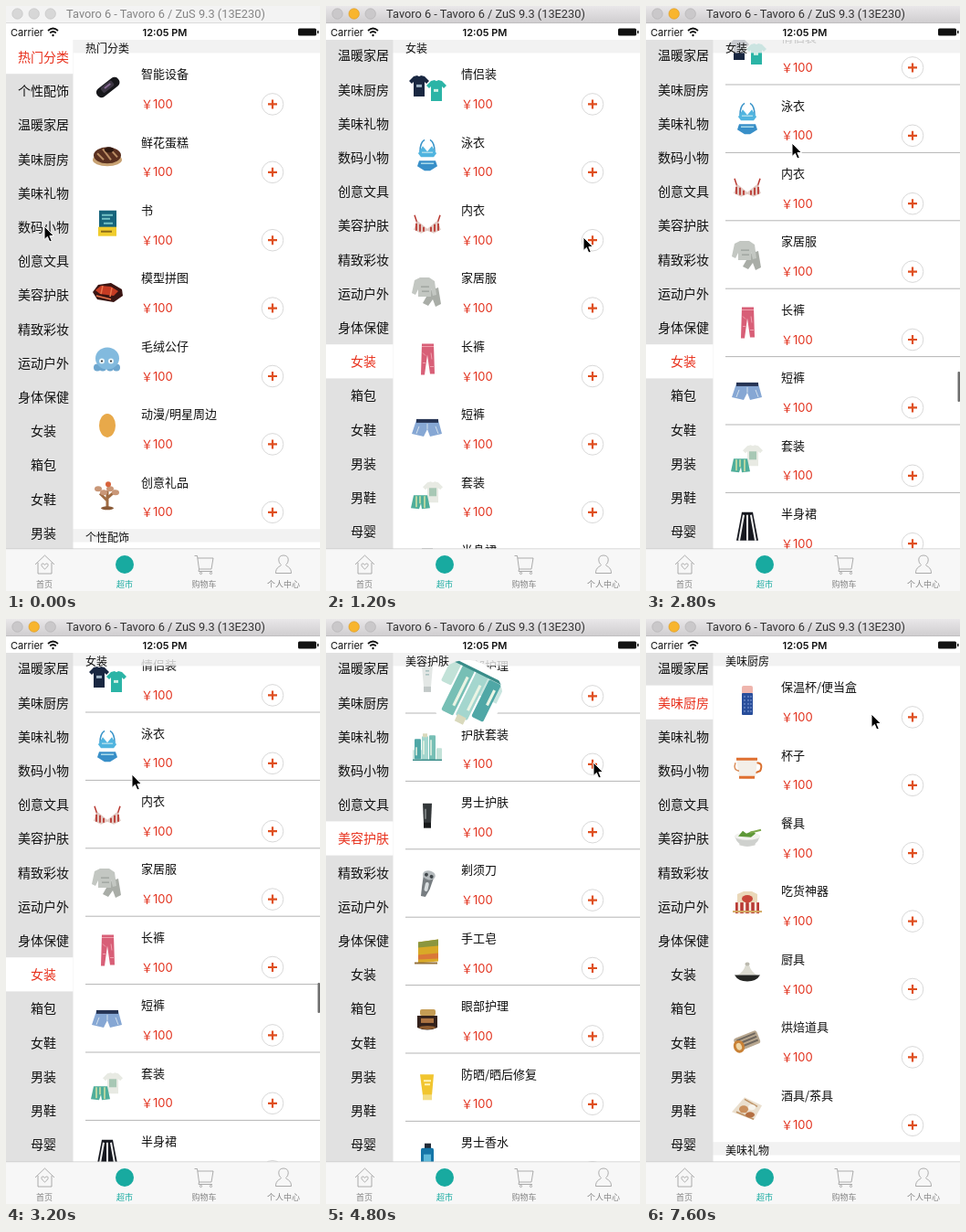
Animation, 344 px wide and 640 px high, one loop 8000 ms. Source, as an HTML page:

```html
<!DOCTYPE html>
<html lang="zh-CN">
<head>
<meta charset="utf-8">
<title>Category list</title>
<style>
html, body { margin: 0; width: 100%; height: 100%; overflow: hidden; background: #fff; }
svg { display: block; width: 344px; height: 640px; font-family: 'Noto Sans CJK SC', 'Noto Sans CJK', sans-serif; }
text { fill: #111; }
.ui { font-family: Roboto, sans-serif; font-size: 12.8px; }
.status { font-family: Inter, sans-serif; font-size: 11px; }
.name { font-size: 13px; }
.head { font-size: 12px; }
.price { font-family: Inter, 'Noto Sans CJK SC', 'Noto Sans CJK', sans-serif; font-size: 13px; fill: #e2331f; }
.side { font-size: 14px; text-anchor: middle; }
.tab { font-size: 9px; text-anchor: middle; fill: #858585; }
.line { fill: none; stroke: #999; stroke-width: .8; stroke-linejoin: round; }
</style>
</head>
<body>
<svg id="stage" viewBox="0 0 344 640">
  <defs>
    <linearGradient id="bar" x2="0" y2="1"><stop stop-color="#e9e7e9"/><stop offset="1" stop-color="#d0ced0"/></linearGradient>
    <clipPath id="screen"><rect y="19" width="344" height="621"/></clipPath>
    <clipPath id="body"><rect y="37" width="344" height="557"/></clipPath>
    <clipPath id="disc"><circle r="19"/></clipPath>
  </defs>
  <rect width="344" height="640" fill="#fff"/>
  <g clip-path="url(#body)"><g id="list"></g><g id="side"></g></g>
  <g id="status">
    <rect y="18" width="344" height="19" fill="#fff"/>
    <text class="status" x="5" y="32.5">Carrier</text>
    <g fill="none" stroke="#111" stroke-width="1.7">
      <path d="M46 27q5.500-5 11 0M48.200 29.500q3.300-3 6.600 0"/>
      <path d="M50.500 31.500l1 1 1-1" stroke-width="1.500"/>
    </g>
    <text class="status" x="174" y="32.500" text-anchor="middle" font-weight="600">12:05 PM</text>
    <rect x="320" y="24.500" width="20" height="8" rx="1.500" fill="#111"/>
    <rect x="341" y="27" width="1.500" height="3" fill="#111"/>
  </g>
  <g id="tabs">
    <rect y="594" width="344" height="46" fill="#f7f7f7"/>
    <rect y="593.500" width="344" height=".7" fill="#c9c9c9"/>
    <g class="line">
      <path d="M32 611l10.500-10 10.500 10M35 609v12h15v-12"/>
      <path d="M42.500 616c-7-5-2-8 0-4.500c2-3.500 7-.5 0 4.500z"/>
      <path d="M206.500 601.500h3l2 14.500h13.500l2-12h-17M211.500 616l-.5 2.500h15"/>
      <circle cx="213.500" cy="620.500" r="1.100"/><circle cx="224.500" cy="620.500" r="1.100"/>
      <path d="M304 601c7 0 6 8 2.500 10.500c1 2 6 2 6 9h-17c0-7 5-7 6-9c-3.500-2.500-4.500-10.500 2.500-10.500z"/>
    </g>
    <circle cx="130" cy="611" r="10" fill="#18aaa0"/>
    <text class="tab" x="42" y="635.500">首页</text>
    <text class="tab" x="130" y="635.500" style="fill:#18aaa0">超市</text>
    <text class="tab" x="217" y="635.500">购物车</text>
    <text class="tab" x="304" y="635.500">个人中心</text>
  </g>
  <g id="fly" clip-path="url(#screen)"></g>
  <g id="title"></g>
  <path id="cursor" d="M0 0V14.500L3.400 11.400L5.800 17L8.300 16L5.900 10.500H10.400Z" fill="#000" stroke="#fff" stroke-width="1"/>
</svg>
<script>
const STEP = 400, LOOP = 8000, ROW = 74.4, SIDE_ROW = 37.2, HEAD = 14.4, TOP = 37;
const $ = id => document.getElementById(id);

const path = (d, fill, extra = '') => `<path d="${d}" fill="${fill}" ${extra}/>`;
const box = (x, y, w, h, fill, rx = 0) => `<rect x="${x}" y="${y}" width="${w}" height="${h}" rx="${rx}" fill="${fill}"/>`;
const oval = (x, y, rx, ry, fill) => `<ellipse cx="${x}" cy="${y}" rx="${rx}" ry="${ry}" fill="${fill}"/>`;
const stroke = (d, color, w = 1, extra = '') => path(d, 'none', `stroke="${color}" stroke-width="${w}" ${extra}`);
const tilt = (deg, art) => `<g transform="rotate(${deg})">${art}</g>`;
const tee = (x, y, fill) => path(`M${x - 6} ${y}l4-1q2 2 4 0l4 1 5 5-3 3-2-2v16h-12v-16l-2 2-3-3z`, fill);

// Product pictures, centred on 0,0
const art = {
  智能设备: () => tilt(-38, box(-14, -5, 29, 11, '#17171b', 5) + box(-7, -4, 15, 7, '#3b3542', 2) + box(-3, -2, 8, 2, '#8a6d98')),
  鲜花蛋糕: () => oval(0, 5, 16, 7, '#c8a273') + oval(0, 0, 15, 9, '#5a3020') + stroke('M-11-2l7 7M-5-7l9 12M3-7l8 9', '#b98d64', 2) + oval(2, -6, 5, 3, '#2e1810'),
  书: () => box(-9, -14, 19, 20, '#17647c') + box(-10, 4, 20, 10, '#f0cc2c') + stroke('M-6-9h12M-6-5h9M-4 0h10', '#74c2c5', 2) + stroke('M-7 9h12', '#8a6b17', 2),
  模型拼图: () => path('M-16 1l6-8 14-2 12 7 1 7-10 7-18-3z', '#3a1513') + path('M-13-1l6-5 11 1 8 5-5 5-15-2z', '#c63b23') + stroke('M-12 5l16 4M-5-6l-2 9M5-4l-2 10', '#ec754c', 1.500),
  毛绒公仔: () => [-11, -5, 3, 10].map(x => oval(x, 9, 4, 4, '#6da6ce')).join('') + oval(0, -1, 13, 12, '#82bade') + oval(-6, 2, 3, 3, '#eaf4f8') + oval(4, 2, 3, 3, '#eaf4f8') + oval(-6, 2, 1, 1, '#222') + oval(4, 2, 1, 1, '#222'),
  '动漫/明星周边': () => oval(0, -2, 9, 13, '#e8a94a'),
  创意礼品: () => stroke('M0 15V-5M0 6l-8-8M0 3l9-8', '#a06c43', 3) + [-10, -4, 3, 9].map((x, i) => oval(x, -7 + i % 2 * 4, 4, 3, '#c99778')).join('') + oval(0, 14, 7, 2, '#8a5a37') + oval(1, -12, 3, 3, '#d8633b'),
  电脑周边: () => path('M-7-13l4 3h6l4-3 3 8 4 8-3 8-6 2-5-3-5 3-6-2-3-8 4-8z', '#1d1e20') + oval(0, 0, 4, 9, '#3a3d40') + stroke('M-9-3l-2 9M9-3l2 9', '#55595c', 1.500) + box(-1, -4, 2, 4, '#88a32f'),
  '耳机/音响': () => stroke('M-9 4C-14-18 12-19 9 4', '#d9d4ce', 3) + tilt(-8, oval(-7, 6, 5, 8, '#e9e5e0') + oval(-5, 6, 3, 6, '#bdb5ad')) + oval(8, 6, 4, 8, '#d2ccc5'),
  摄影周边: () => path('M-15 0l10-7 14 1 7 6-1 7-15 4-13-3z', '#1c1d20') + oval(-8, 3, 6, 6, '#3d4045') + oval(-9, 3, 3, 4, '#0c0c0e') + stroke('M-2-3l13 2M0 2l14 1', '#5b5e61', 2),
  手机壳: () => box(-9, -14, 18, 26, '#efc92e'),
  手机周边: () => tilt(-8, box(-18, -6, 36, 11, '#26333e', 2) + box(-16, -5, 30, 9, '#a9d2e4') + path('M-14 4l8-6 6 4 8-6 4 8z', '#f1f0e8') + box(6, -5, 6, 9, '#4a719c') + box(-13, 5, 9, 4, '#59636a')),
  移动电源: () => ['#329c91', '#74cbbb', '#ed7187', '#f4f1f1'].map((c, i) => oval(0, 10 - i * 6, 12, 3.5, '#999') + oval(0, 8.5 - i * 6, 12, 3.5, c)).join(''),
  办公收纳: () => stroke('M-8 0l-4-12M-3-2v-13M3-2l4-11M8 0l4-10', '#46565d', 2) + path('M-13-1h26l-1 13q-12 7-24 0z', '#14171b') + oval(0, -1, 13, 5, '#252d33') + oval(0, -2, 9, 3, '#2e93a3'),
  情侣装: () => tee(-9, -12, '#192741') + tee(10, -7, '#2bb4a6') + box(-12, -3, 6, 3, '#9db2c3') + box(7, 2, 5, 3, '#cbeee3'),
  泳衣: () => stroke('M-8-4q0-10 5-13M8-4q0-10-5-13', '#3994c9', 1.500) + path('M-10-2l5-8 5 6 5-6 5 8-3 4H-7z', '#50b4df') + path('M-9 6H9l2 6-8 5H-3l-8-5z', '#388fc8') + stroke('M-6-3h12M-7 9h14', '#a9dbeb', 1.500),
  内衣: () => stroke('M-14-9l4 12M14-9l-4 12', '#b83931', 1.500) + path('M-15 7l4-10 11 9 11-9 4 10-8 4-7-3-7 3z', '#e3cbc5') + stroke('M-12 0v8M-8 1v8M-4 4v5M4 4v5M8 1v8M12 0v8', '#b83931', 1.800),
  家居服: () => path('M3-1l9-3 3 18-6 3-3-8-5 7-6-3z', '#a9ada7') + path('M-8-15h10l6 4 2 15-4 1-2-8v9h-14v-8l-3 6-4-2 3-14z', '#c3c7c2') + stroke('M-7-5h9M-6 0h8', '#8f9691'),
  长裤: () => path('M-6-17H7L8 16H3L0-5-3 17h-4z', '#d85f77') + stroke('M-6-14H7M-5-7l3 3M4-7l1 7M-5 4h3M3 8h4', '#f0a0ad'),
  短裤: () => path('M-12-8h24l4 15-13 3-3-8-4 8-13-3z', '#86a7d4') + box(-12, -9, 24, 4, '#263454') + stroke('M-9-1l-3 8M9-1l3 8M0-4v6', '#d3e1ed'),
  套装: () => tee(6, -14, '#e8eae3') + box(2, -8, 8, 9, '#a8c8b5') + path('M-15 0H0l3 14-9 1-1-6-2 6-9-1z', '#4fae9b') + stroke('M-12 1v12M-8 1v8M-3 1v13', '#d8e2a5', 1.500),
  半身裙: () => path('M-6-16H6l6 31h-24z', '#16181f') + stroke('M-4-13l-5 28M0-13v28M4-13l5 28', '#f1f1f1', 2),
  面部护理: () => path('M-6-15H6L4 8h-8z', '#e3e7e5') + box(-4, 8, 8, 6, '#c2c9c8') + stroke('M-2-9h4M-2-5h4', '#8aa'),
  护肤套装: () => box(-16, 3, 14, 11, '#c9e5df') + box(-14, -9, 7, 22, '#4fa7a6', 1) + box(-6, -12, 7, 26, '#a4d6ce', 1) + box(2, -13, 7, 27, '#77bfb5', 1) + box(10, 1, 6, 13, '#c2e2d8', 1) + box(-5, -15, 5, 4, '#d9d9bc') + stroke('M-4-7v15M4-8v17M-12 0v9', '#eaf4e4', 1.500) + stroke('M-16 14h32', '#398c89', 1.500),
  男士护肤: () => path('M-5-13H5L4 9h-8z', '#34383a') + box(-4, 8, 8, 6, '#17191a') + stroke('M-2-7v11', '#8b9192', 1.500),
  剃须刀: () => tilt(12, path('M-6-9q6-7 12-1L4 6l-3 9h-5L-5 5z', '#777d81') + oval(0, -9, 7, 5, '#b4babd') + oval(-3, -9, 2, 2, '#40464a') + oval(3, -8, 2, 2, '#40464a') + box(-2, -1, 4, 10, '#d8dddf', 2)),
  手工皂: () => path('M-10-10L12-13V11L-10 13z', '#d9a927') + path('M-10-10L12-13v7L-10-4z', '#8b963e') + path('M-10 4L12 2v6L-10 9z', '#da7838') + stroke('M-14 13h25', '#94713c', 2),
  眼部护理: () => box(-8, -11, 17, 7, '#c59d55', 2) + path('M-11-4h22v13q-11 5-22 0z', '#33211b') + box(-7, -1, 14, 5, '#ad7443') + oval(0, 9, 9, 2, '#8f5c2f'),
  '防晒/晒后修复': () => path('M-8-14H7L5 9H-5z', '#f1c52f') + box(-5, 8, 10, 6, '#f3dd85') + stroke('M-4-7h8M-3-3h6', '#fff3b8', 2),
  男士香水: () => box(-3, -13, 7, 6, '#222c38') + box(-7, -8, 14, 24, '#1676a8', 2) + box(-4, -1, 8, 8, '#5fb9d9'),
  '保温杯/便当盒': () => box(-6, -16, 12, 9, '#efb5ad', 2) + box(-6, -8, 12, 24, '#284d9a', 1) + stroke('M-3-5v18M1-5v18M4-5v18', '#8ca6dc', 1, 'stroke-dasharray="2"'),
  杯子: () => stroke('M10-6q8 0 4 9l-5 2', '#d9702f', 2) + path('M-12-11H11L9 10q-9 4-18 0z', '#f3efe9') + stroke('M-12-10h23M-9 10h17', '#df7031', 3) + stroke('M-13-6q-3 8 4 9', '#da8c58', 1.500),
  餐具: () => oval(0, 9, 9, 2, '#d5d5d2') + path('M-14 0h28q-4 11-14 11T-14 0z', '#cfd1ce') + oval(0, 0, 14, 4, '#f2f2ef') + path('M-10 0l5-6 4 3 7-3 3 3-5 4z', '#5e9838') + stroke('M3-4l12-3', '#7ea84b', 2),
  吃货神器: () => path('M-11-11l7-3h9l6 3v11h-22z', '#ead8b9') + box(-13, -2, 26, 12, '#b83a34') + stroke('M-9-2v12M-3-2v12M3-2v12M9-2v12', '#f6eadf', 2.500) + oval(0, -6, 6, 4, '#c9473a') + stroke('M-16 8h32', '#d3aa63', 2),
  厨具: () => path('M-11 3Q-4 0-2-8h4Q4 0 11 3z', '#dddcd2') + oval(0, -9, 2.500, 2, '#bbb9ae') + path('M-14 3h28q-4 7-14 7T-14 3z', '#252624'),
  烘焙道具: () => tilt(-22, box(-14, -7, 27, 15, '#b8a78f', 3) + stroke('M-11-4h22M-11 0h22M-11 4h22', '#6f675e', 2) + oval(-11, 3, 6, 7, '#c98135') + oval(-11, 3, 3, 4, '#efd7a7')),
  '酒具/茶具': () => path('M-17 4l14-16 19 9-9 16z', '#eadfce') + stroke('M-12 4l19 8M-3-10l14 8', '#bd9164', 1.500) + oval(-4, 1, 5, 4, '#c98f5c') + oval(5, -1, 4, 3, '#f7f4ed') + oval(3, 7, 5, 3, '#b46f42'),
};

const menu = '热门分类 个性配饰 温暖家居 美味厨房 美味礼物 数码小物 创意文具 美容护肤 精致彩妆 运动户外 身体保健 女装 箱包 女鞋 男装 男鞋 母婴'.split(' ');
const goods = {
  热门分类: '智能设备 鲜花蛋糕 书 模型拼图 毛绒公仔 动漫/明星周边 创意礼品',
  数码小物: '电脑周边 耳机/音响 摄影周边 手机壳 手机周边 移动电源',
  创意文具: '办公收纳',
  女装: '情侣装 泳衣 内衣 家居服 长裤 短裤 套装 半身裙',
  美容护肤: '面部护理 护肤套装 男士护肤 剃须刀 手工皂 眼部护理 防晒/晒后修复 男士香水',
  美味厨房: '保温杯/便当盒 杯子 餐具 吃货神器 厨具 烘焙道具 酒具/茶具',
};

// [start ms, section, scroll offset, scroll bar top]
const views = [
  [0, '热门分类', 0], [400, '数码小物', 0], [800, '女装', 0],
  [2000, '女装', 10, 398], [2400, '女装', 60, 401], [2800, '女装', 40, 400], [3200, '女装', 24, 398],
  [3600, '美容护肤', 0], [4000, '美容护肤', 10, 262], [4400, '美容护肤', 23, 263], [4800, '美容护肤', 23],
  [6000, '美味厨房', 0],
];
// Pointer tip at each step
const pointer = [
  [42, 241], [46, 337], [36, 388], [282, 253], [304, 108], [205, 41], [190, 110], [160, 150], [138, 170], [46, 238],
  [180, 190], [270, 165], [293, 157], [210, 135], [70, 105], [50, 91], [200, 100], [291, 106], [275, 106], [247, 104],
];
// Add-to-cart flights
const flights = [
  { at: 4500, item: '护肤套装', y: 70 },
  { at: 6500, item: '保温杯/便当盒', y: 45 },
];

const label = (cls, x, y, s, extra = '') => `<text class="${cls}" x="${x}" y="${y}" ${extra}>${s}</text>`;
const header = (y, s) => box(73, y, 271, HEAD, '#f0f0f0d0') + label('head', 87, y + 14, s);

function row(y, item, ruled) {
  return `<g transform="translate(0 ${y})">
    <g transform="translate(111 37.500)">${art[item]()}</g>
    ${label('name', 148, 27.8, item)}${label('price', 148, 60.6, '￥100')}
    <circle cx="292" cy="56" r="11.8" fill="#fff" stroke="#d9d9d9"/>
    <path d="M287 56h10M292 51v10" stroke="#df4f20" stroke-width="2.2"/>
    ${ruled ? box(87, ROW - .3, 257, 1, '#b5b5b5') : ''}</g>`;
}

function drawList(name, offset, bar) {
  const rows = (s, y) => goods[s] ? goods[s].split(' ').map((g, i) => row(y + i * ROW, g, offset > 0)).join('') : '';
  const next = menu[menu.indexOf(name) + 1];
  const start = TOP + HEAD - offset;
  const end = start + goods[name].split(' ').length * ROW;
  let out = rows(name, start);
  if (end < 594) out += header(end, next) + rows(next, end + HEAD);
  out += header(TOP, name);
  if (bar) out += box(341.5, bar, 2.5, 33, '#6d6d6d', 1);
  return out;
}

function drawSide(name, scroll) {
  return box(0, TOP, 73.5, 557, '#e1e1e1') + menu.map((s, i) => {
    const y = TOP + i * SIDE_ROW - scroll, on = s === name;
    return (on ? box(0, y, 73.5, SIDE_ROW, '#fff') : '') +
      label('side', 41, y + 24, s, on ? 'style="fill:#e8301c"' : '');
  }).join('');
}

function drawTitle(active) {
  const lamp = (x, c, rim) => `<circle cx="${x}" cy="8.500" r="5.700" fill="${c}" stroke="${rim}" stroke-width=".7"/>`;
  const off = active ? ['#cac8ca', '#b5b3b5'] : ['#d7d7d7', '#c5c5c5'];
  return box(0, 0, 344, 18, active ? 'url(#bar)' : '#f3f3f3') + box(0, 18, 344, .8, active ? '#b1afb1' : '#d2d2d2') +
    lamp(12.5, ...off) + lamp(30.7, ...(active ? ['#f8b52e', '#dc9b24'] : off)) + lamp(48.7, ...off) +
    label('ui', 175, 13, 'Tavoro 6 - Tavoro 6 / ZuS 9.3 (13E230)', `text-anchor="middle" style="fill:${active ? '#333' : '#858585'}"`);
}

function drawFlight(t) {
  const f = flights.find(f => t >= f.at && t < f.at + 1000);
  if (!f) return '';
  const k = (t - f.at) / 1000;
  const curve = (a, b, c) => (1 - k) ** 2 * a + 2 * k * (1 - k) * b + k * k * c;
  const x = curve(123, 178, 215), y = curve(f.y, f.y - 80, 595);
  return `<g transform="translate(${x} ${y}) rotate(${k * 12 * 180 / Math.PI}) scale(2.05)" clip-path="url(#disc)">
    ${oval(0, 0, 19, 19, '#fff')}${art[f.item]()}</g>`;
}

let shown = -1;
function render(step) {
  const t = step * STEP;
  const [, name, offset, bar] = views.filter(v => v[0] <= t).pop();
  $('list').innerHTML = drawList(name, offset, bar);
  $('side').innerHTML = drawSide(name, step ? 76 : 0);
  $('title').innerHTML = drawTitle(step > 0);
  $('fly').innerHTML = drawFlight(t);
  $('cursor').setAttribute('transform', `translate(${pointer[step]})`);
}

const t0 = performance.now();
function tick() {
  const step = Math.floor((performance.now() - t0) % LOOP / STEP);
  if (step !== shown) render(shown = step);
  requestAnimationFrame(tick);
}
tick();
</script>
</body>
</html>
```
